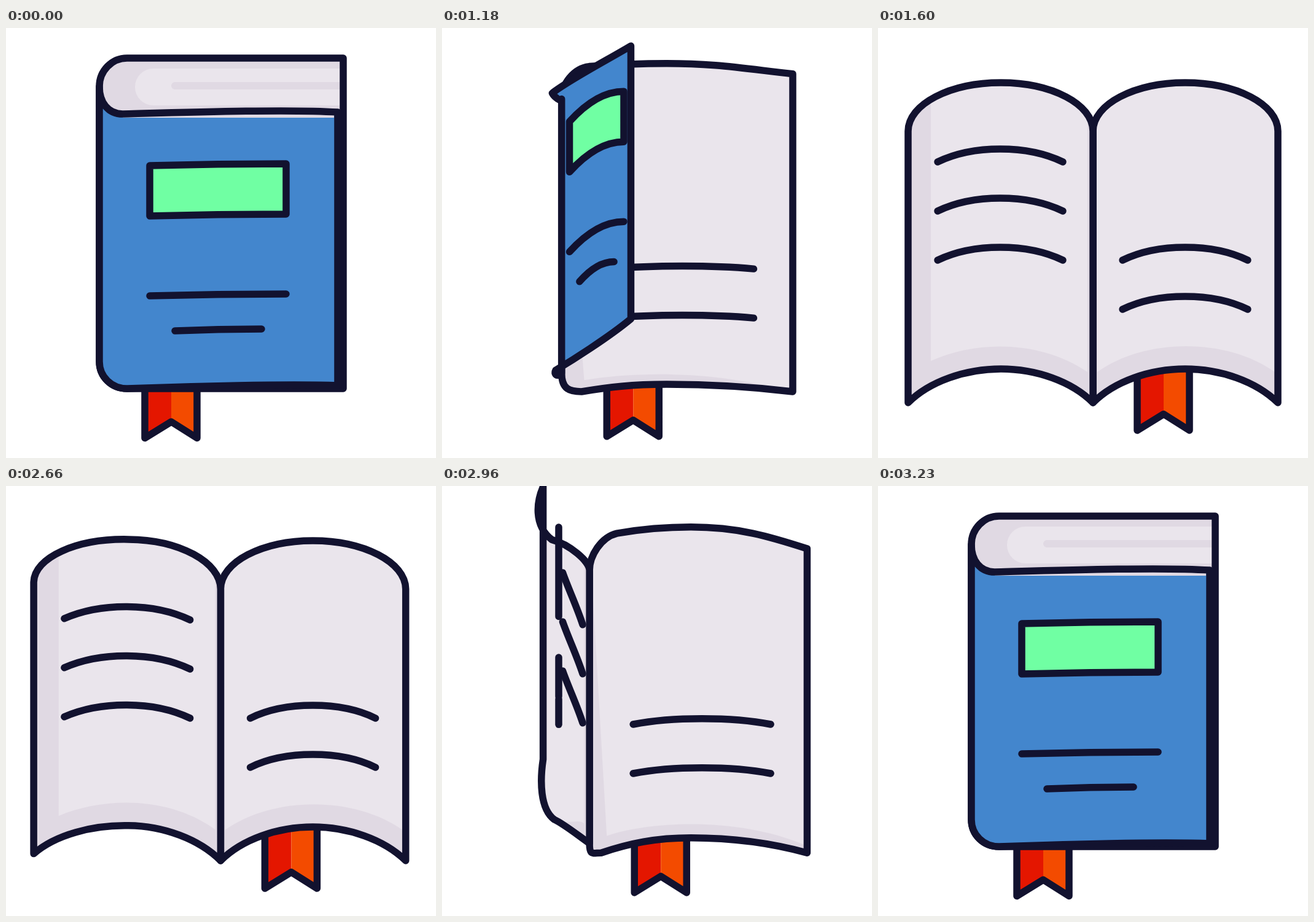
An HTML page with a canvas for the animation above (3260 ms loop, 700x700 px).

```html
<!DOCTYPE html>
<html lang="en">
<head>
<meta charset="utf-8">
<title>Book</title>
<style>
html, body { margin: 0; width: 100%; height: 100%; overflow: hidden; background: #fff; }
canvas { display: block; width: 100vmin; height: 100vmin; }
</style>
</head>
<body>
<canvas id="stage" width="700" height="700"></canvas>
<script>
const ctx = document.getElementById('stage').getContext('2d');
const INK = '#12122f', LIGHT = '#eae5ec', SHADE = '#e0d9e3', DARK = '#cdc4d4';
const LOOP = 3260, STEP = 30, STEPS = 20, OPEN_AT = 1030, CLOSE_AT = 2660;

// State of the current pose: turn of the cover, eased opening, spine position.
let turned, open, settled, spine, swing, lift;

function setPose(u) {
  turned = u;
  open = .5 - .5 * Math.cos(Math.PI * u);
  settled = Math.min(1, 1.3 * open);
  spine = at(152, 350);
  swing = 158 * Math.sin(Math.PI * u) ** (.95 + .6 * u);
  lift = 152 * Math.sin(Math.PI * u ** 1.05) ** 1.2;
  if (u === 0 || u === 1) swing = lift = 0;
}

// Value between its closed and open states.
function at(closed, opened, k = open) { return closed + (opened - closed) * k; }

// Point on the cover: travels from closed to open while swinging out and up.
function turn(x0, y0, x1, y1, wx, wy = wx) {
  return [at(x0, x1) - wx * swing, at(y0, y1) - wy * lift];
}

function trace(points, joined) {
  if (joined) ctx.lineTo(...points[0]);
  else ctx.moveTo(...points[0]);
  for (let i = 1; i < points.length; i += 3) ctx.bezierCurveTo(...points.slice(i, i + 3).flat());
}

function shape(...curves) {
  ctx.beginPath();
  curves.forEach((c, i) => trace(c, i > 0));
  ctx.closePath();
}

function polygon(...points) {
  ctx.beginPath();
  points.forEach(p => ctx.lineTo(...p));
  ctx.closePath();
}

function fill(color) { ctx.fillStyle = color; ctx.fill(); }

function stroke(color = INK, width = 11.5) {
  ctx.strokeStyle = color;
  ctx.lineWidth = width;
  ctx.stroke();
}

function textLines(points, count) {
  for (let i = 0; i < count; i++) {
    ctx.beginPath();
    trace(points.map(([x, y]) => [x, y + 80 * i]));
    stroke();
  }
}

function drawRibbon() {
  const left = 226, mid = 269, right = 311, top = 560, notch = 641, tip = 667.5;
  ctx.save();
  ctx.translate(196 * open, -12.5 * open);
  polygon([left, top], [mid, top], [mid, notch], [left, tip]);
  fill('#e41600');
  polygon([mid, top], [right, top], [right, tip], [mid, notch]);
  fill('#f34b00');
  polygon([left, top], [right, top], [right, tip], [mid, notch], [left, tip]);
  stroke();
  ctx.restore();
}

// Page block seen above the closed cover.
function drawBlock(coverTop) {
  const v = Math.min(1, turned / .06);
  ctx.globalAlpha = Math.min(1, (.3 - turned) / .2);
  ctx.fillStyle = SHADE;
  ctx.fillRect(0, 0, 700, 150);
  ctx.beginPath();
  ctx.roundRect(spine + 58 - 14 * v, 66 - 8 * v, 600, 60 + 474 * v, 30);
  fill(LIGHT);
  polygon([275 + 460 * turned, 94 - 200 * turned], [640, 94 - 140 * turned]);
  stroke(SHADE, 12);
  if (turned > 0) {
    ctx.beginPath();
    trace(coverTop);
    stroke(DARK, 23);
    ctx.beginPath();
    ctx.moveTo(spine, 130);
    ctx.lineTo(spine, 95);
    ctx.bezierCurveTo(spine, 70, spine + 20, 49, spine + 45, 49);
    ctx.lineTo(560, 51);
    stroke(DARK, 19);
  }
  ctx.globalAlpha = 1;
}

function drawPage(coverTop) {
  const right = at(549, 651), mid = at(329, 500), crest = at(49, 89), dip = at(587, 555);
  const hingeTop = at(95, 168, settled), hingeBottom = at(543, 610, settled);
  const corner = spine + 45 * (1 - settled), foot = at(587, 610);
  const top = [
    [spine, hingeTop],
    [spine, hingeTop - at(25, 22)], [at(172, 367), at(49, 126)], [at(197, 394), at(49, 112)],
    [at(241, 421), at(49, 98)], [mid - 42, crest], [mid, crest],
    [at(402, 583), crest], [at(440, 651), at(49, 124)], [right, at(49, 168)]];
  const bottom = [
    [right, foot],
    [at(476, 615), at(587, 575)], [at(402, 557), dip], [mid, dip],
    [mid - 57, dip], [at(241, 385), at(587, 575)], [corner, foot],
    [at(corner - 25, corner), foot], [spine, at(hingeBottom + 25, foot)], [spine, hingeBottom]];

  shape(top, bottom);
  fill(SHADE);
  ctx.save();
  ctx.clip();
  const bandRight = at(543, 646), bandY = at(573, 504);
  ctx.beginPath();
  ctx.moveTo(spine + 5, 0);
  ctx.lineTo(spine + 5, 170);
  trace([[at(197, 357), at(577, 560)], [at(285, 435), bandY], [at(430, 568), bandY],
    [bandRight, at(603, 560)]], true);
  ctx.lineTo(700, at(603, 560));
  ctx.lineTo(700, 0);
  fill(LIGHT);
  if (turned < .3) drawBlock(coverTop);
  ctx.restore();

  const x0 = at(241.5, 398), x1 = at(481.5, 602), y = at(396, 378);
  const inset = (x1 - x0) * .28, rise = 28 * open;
  textLines([[x0, y], [x0 + inset, y - rise], [x1 - inset, y - rise], [x1, y]], 2);
  shape(top, bottom);
  stroke();
}

// Label and title lines fold towards one upright line as the cover turns.
function drawDecor() {
  const fold = Math.max(0, 1 - turned / .465) ** .85;
  const folded = (x, y) => [190 + (x - 190) * fold, y - (.2 + x / 550) * lift];
  const bow = (a, b) =>
    ctx.quadraticCurveTo((a[0] + b[0]) / 2, (a[1] + b[1]) / 2 - Math.abs(a[1] - b[1]) / 2, ...b);
  const line = (x0, x1, y) => {
    const a = folded(x0, y), b = folded(x1, y - 3);
    ctx.beginPath();
    ctx.moveTo(...a);
    bow(a, b);
    return [a, b];
  };
  const [a, b] = line(234, 456, 224);
  const lower = ([x, y]) => [x, y + 82];
  ctx.lineTo(...lower(b));
  bow(lower(b), lower(a));
  ctx.closePath();
  fill('#70ffa3');
  stroke();
  line(234, 456, 436);
  stroke();
  line(275, 416, 493);
  stroke();
}

function drawInside() {
  ctx.save();
  ctx.clip();
  const corner = turn(234, 544, 86, 542, .12, .45);
  ctx.beginPath();
  ctx.moveTo(corner[0], 0);
  trace([corner, turn(204, 690, 160, 508, .1, .2), turn(196, 650, 265, 508, .05, .35),
    [spine - 9, 560 - .07 * lift]], true);
  ctx.lineTo(spine - 9, 0);
  fill(LIGHT);
  ctx.restore();
  if (turned < .5) drawDecor();
  textLines([turn(443, 125, 97, 218, .59, .17), turn(347, 150, 155, 190, .355, 0),
    turn(342, 215, 243, 190, .5, .05), turn(225, 232, 301, 218, .19, 0)], 3);
}

function drawCover(top, bottom) {
  const outline = [top, bottom.slice().reverse()];
  shape(...outline);
  if (turned > .42) {
    fill(SHADE);
    drawInside();
  } else {
    fill('#4386cd');
    if (turned === 0) {
      polygon([190, 140], [534, 137], [534, 146], [190, 146]);
      fill(SHADE);
    }
    drawDecor();
  }
  shape(...outline);
  stroke();
}

function draw(u) {
  setPose(u);
  const top = [
    [spine, at(95, 168, settled)], [spine, at(121, 124)],
    turn(166, 140, 283, 89, .07, .15), turn(190, 140, 200, 89, .1, .2),
    turn(300, 137, 117, 89, .45, .35), turn(460, 132, 49, 124, .78, .7),
    turn(540, 137, 49, 168, 1)];
  const bottom = [
    [spine, at(543, 610, settled)], [at(152, 315), at(568, 575)],
    turn(172, 587, 257, 555, .07, .15), turn(197, 587, 200, 555, .1, .2),
    turn(300, 583, 143, 555, .45, .3), turn(460, 579, 84, 575, .85, .65),
    turn(540, 582, 49, 610, 1)];
  ctx.clearRect(0, 0, 700, 700);
  drawRibbon();
  drawPage(top);
  drawCover(top, bottom);
}

function progress(t) {
  const stepsSince = start => Math.floor((t - start) / STEP) + 1;
  if (t < OPEN_AT) return 0;
  if (t < CLOSE_AT) {
    const k = stepsSince(OPEN_AT);
    return k >= STEPS ? 1 : (k + .15) / STEPS;
  }
  const k = stepsSince(CLOSE_AT);
  return k >= STEPS ? 0 : 1 - (k - .3) / STEPS;
}

ctx.lineCap = ctx.lineJoin = 'round';
const start = performance.now();
function tick() {
  draw(progress((performance.now() - start) % LOOP));
  requestAnimationFrame(tick);
}
tick();
</script>
</body>
</html>
```
